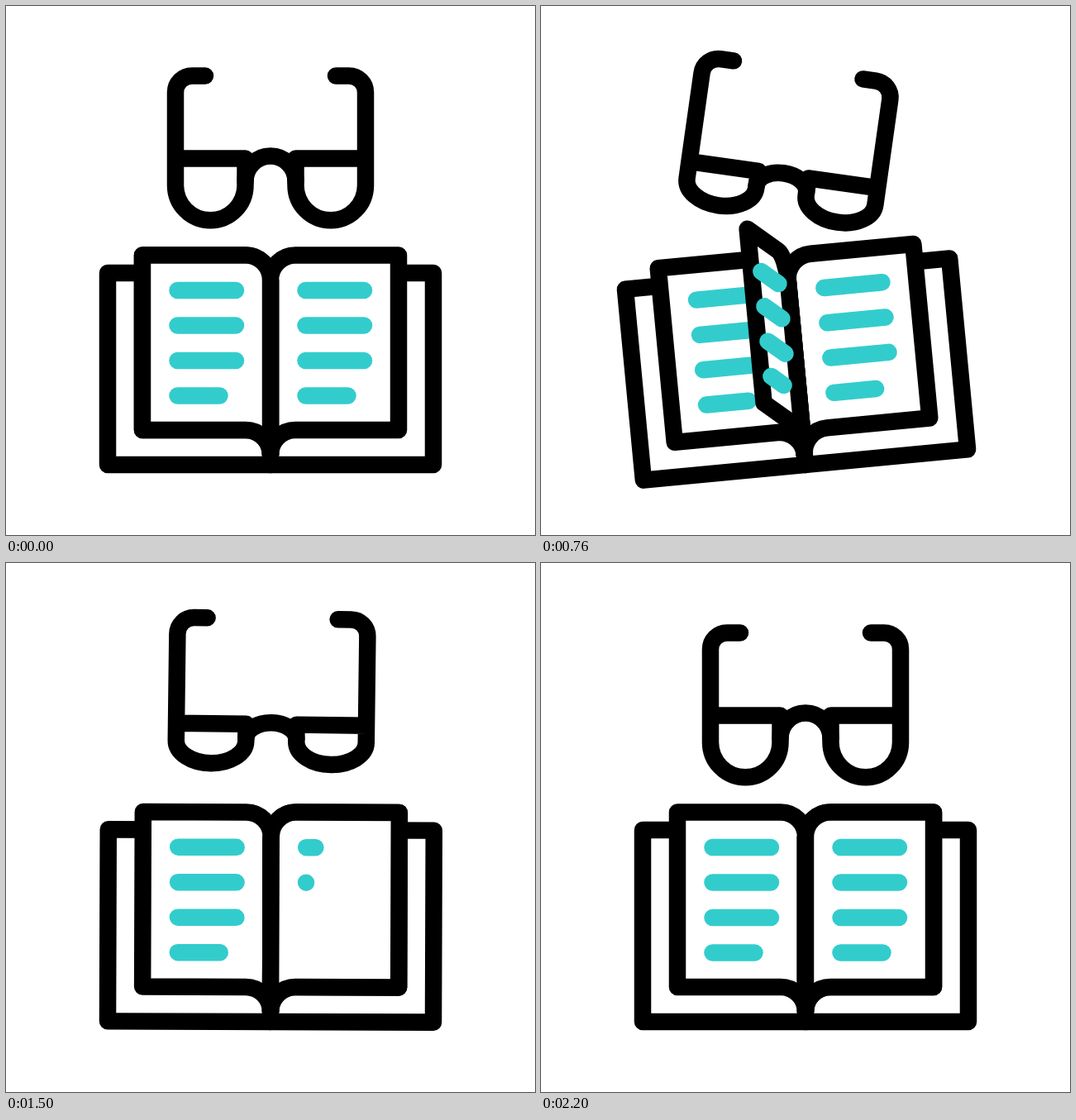
Recreate the animation shown at these times as an HTML page with a canvas. Size 640 by 640 pixels, loop 2400 ms.

```html
<!DOCTYPE html>
<html lang="en">
<head>
<meta charset="utf-8">
<title>Reading</title>
<style>
  html, body { margin: 0; width: 100%; height: 100%; overflow: hidden; background: #fff; }
  canvas { display: block; width: 640px; height: 640px; }
</style>
</head>
<body>
<canvas id="stage" width="640" height="640"></canvas>
<script>
const ctx = document.getElementById('stage').getContext('2d');
const LOOP = 2400, INK = '#000', TEAL = '#33cccc';
const SPINE = 320, FOOT = 555, PAGE = 155, LIFT = 51.5;
const ROWS = [[344, 70.5], [386.5, 70.5], [429, 70.5], [471.5, 51]];

// rows: time, values...
const BOOK = [[200, 0], [700, -6], [1200, 8], [1700, -4], [2200, 0]];
// time, x, y, angle, tilt
const GLASSES = [
  [200, 320, 184.5, 0, 0],
  [600, 278, 195, 12.1, 1],
  [1200, 364.5, 195.5, -10.8, 1],
  [1800, 278, 195, 12.1, 1],
  [2200, 320, 184.5, 0, 0]
];

const clamp = u => Math.min(1, Math.max(0, u));
const ease = u => u * u * (3 - 2 * u);
const mix = (a, b, u) => a + (b - a) * u;
const rad = deg => deg * Math.PI / 180;

function pose(keys, t) {
  let i = 0;
  while (i < keys.length - 2 && t >= keys[i + 1][0]) i++;
  const a = keys[i], b = keys[i + 1];
  const u = ease(clamp((t - a[0]) / (b[0] - a[0])));
  return a.slice(1).map((v, n) => mix(v, b[n + 1], u));
}

// Places a point of the page; s runs from -1 (flat left) to 1 (flat right).
function place(d, y, s) {
  return [SPINE + d * s, y - LIFT * (1 - Math.abs(s)) * d / PAGE];
}

function page(s) {
  const p = (d, y) => place(d, y, s);
  ctx.beginPath();
  ctx.moveTo(...p(PAGE, 301.5));
  ctx.lineTo(...p(30, 301.5));
  ctx.bezierCurveTo(...p(13.5, 301.5), ...p(0, 315), ...p(0, 331.5));
  ctx.lineTo(...p(0, 543));
  ctx.bezierCurveTo(...p(0, 526.5), ...p(13.5, 513), ...p(30, 513));
  ctx.lineTo(...p(PAGE, 513));
  ctx.closePath();
  ctx.fill();
  ctx.stroke();
}

function lines(s, grown) {
  // Lines read left to right, so they start at the outer edge on the left page.
  const start = s < 0 ? 112.5 : 42.5, dir = s < 0 ? -1 : 1;
  ctx.strokeStyle = TEAL;
  ROWS.forEach(([y, len], i) => {
    const u = grown(i);
    if (u <= 0) return;
    ctx.beginPath();
    ctx.moveTo(...place(start, y, s));
    ctx.lineTo(...place(start + dir * len * u, y, s));
    ctx.stroke();
  });
  ctx.strokeStyle = INK;
}

function book(t) {
  const full = () => 1;
  const flip = mix(-1, 1, clamp((t - 400) / 1000));
  ctx.save();
  ctx.translate(SPINE, FOOT);
  ctx.rotate(rad(pose(BOOK, t)[0]));
  ctx.translate(-SPINE, -FOOT);

  ctx.beginPath();
  ctx.rect(123, 323, 394, 232);
  ctx.fill();
  ctx.stroke();

  for (const side of [-1, 1]) {
    page(side);
    lines(side, full);
  }
  ctx.beginPath();
  ctx.moveTo(SPINE, 332);
  ctx.lineTo(SPINE, FOOT);
  ctx.stroke();

  page(flip);
  if (flip < 0) lines(flip, full);
  else lines(flip, i => ease(clamp((t - 1400 - 100 * i) / 400)));
  ctx.restore();
}

function glasses(t) {
  const [x, y, angle, tilt] = pose(GLASSES, t);
  const swing = ease(clamp((t - 600) / 600));
  const dip = 15.5 * 4 * swing * (1 - swing);
  const v = mix(1, 0.64, tilt), h = mix(100, 128, tilt);
  ctx.save();
  ctx.translate(x, y + dip);
  ctx.rotate(rad(angle));

  for (const side of [-1, 1]) {
    ctx.save();
    ctx.scale(side, 1);
    ctx.beginPath();
    ctx.moveTo(30.5, 0);
    ctx.lineTo(115, 0);
    ctx.lineTo(115, 32.5 * v);
    ctx.ellipse(72.75, 32.5 * v, 42.25, 42.25 * v, 0, 0, Math.PI);
    ctx.closePath();
    ctx.moveTo(115, 0);
    ctx.lineTo(115, 20 - h);
    ctx.arcTo(115, -h, 95, -h, 20);
    ctx.lineTo(79, -h);
    ctx.stroke();
    ctx.restore();
  }
  ctx.beginPath();
  ctx.ellipse(0, 27.5 * v, 30.5, 30.5 * v, 0, Math.PI, 2 * Math.PI);
  ctx.stroke();
  ctx.restore();
}

function draw(t) {
  ctx.fillStyle = '#fff';
  ctx.fillRect(0, 0, 640, 640);
  ctx.strokeStyle = INK;
  ctx.lineWidth = 20.5;
  ctx.lineCap = ctx.lineJoin = 'round';
  book(t);
  glasses(t);
}

const begin = performance.now();
function tick() {
  draw((performance.now() - begin) % LOOP);
  requestAnimationFrame(tick);
}
tick();
</script>
</body>
</html>
```
